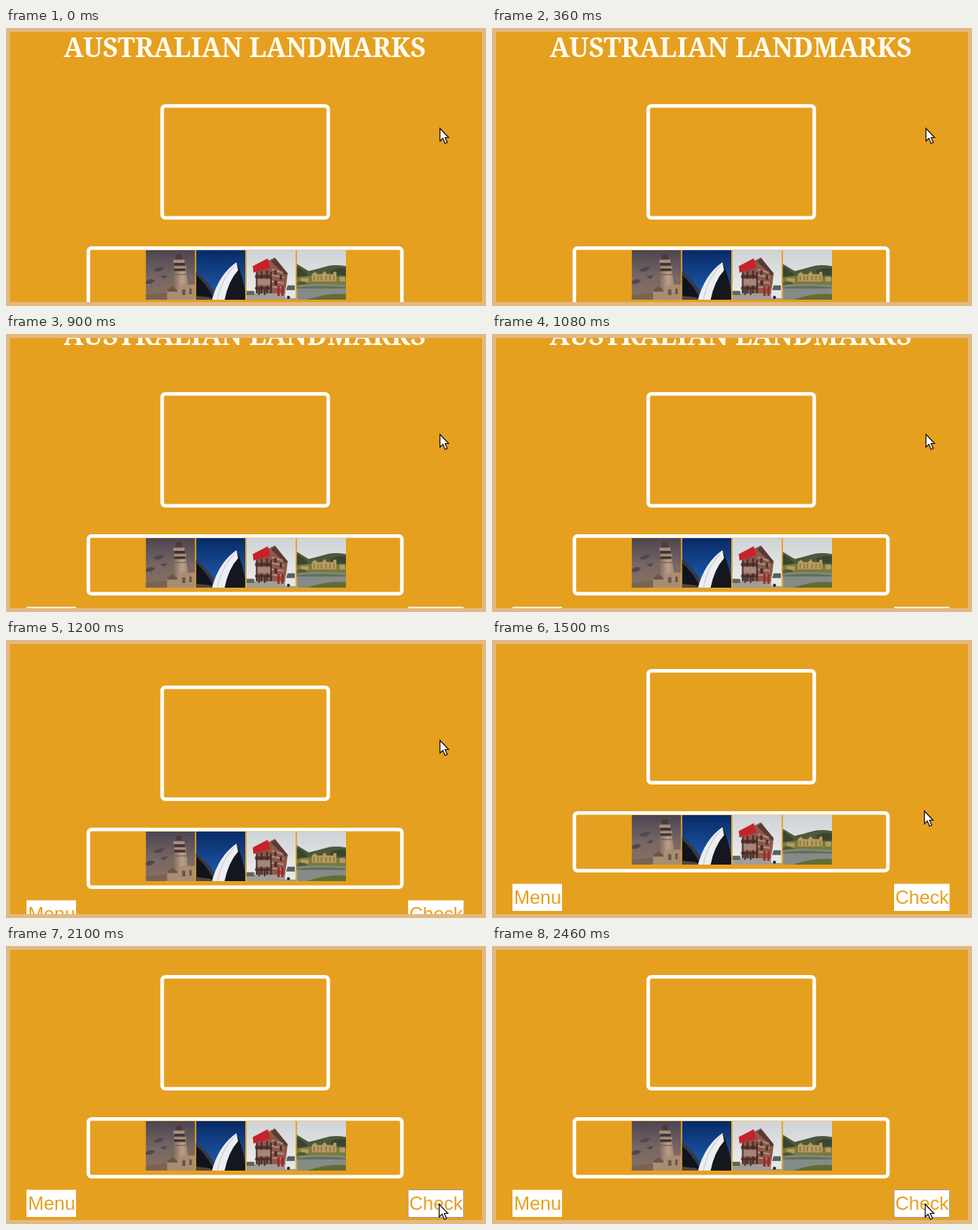
These frames come from a looping animation (610 by 354 pixels, 2.7 s). An HTML page:

```html
<!DOCTYPE html>
<html lang="en">
<head>
<meta charset="utf-8">
<title>Australian Landmarks</title>
<style>
  html, body { margin: 0; width: 100%; height: 100%; overflow: hidden; background: #e3b983; }
  #stage { display: block; width: 610px; height: 354px; }
  .heading { font: bold 33.6px "Noto Serif", serif; fill: #fffdf2; text-anchor: middle; }
  .button { font: 24px "Liberation Sans", Arial, sans-serif; fill: #e6a020; }
  .panel { fill: none; stroke: #fff; stroke-width: 4.5; }
  .page, .pointer, .pressed { animation: scroll 2.7s step-end infinite; }
  .pointer { animation-name: point; }
  .pressed { animation-name: press; }
  @keyframes scroll {
    0% { transform: translateY(0); }
    22.222% { transform: translateY(-11px); }
    33.333% { transform: translateY(-23px); }
    44.444% { transform: translateY(-39px); }
    55.555%, 100% { transform: translateY(-60px); }
  }
  @keyframes point {
    0% { transform: translate(551px, 127px); }
    55.555% { transform: translate(549px, 217px); }
    66.666%, 100% { transform: translate(550px, 328px); }
  }
  @keyframes press {
    0% { opacity: 0; }
    77.777%, 100% { opacity: 1; }
  }
</style>
</head>
<body>
<svg id="stage" viewBox="0 0 610 354">
  <defs>
    <clipPath id="view"><rect x="5" y="5" width="600" height="344"/></clipPath>
    <linearGradient id="dusk" x2="0" y2="1">
      <stop stop-color="#4c4550"/><stop offset=".55" stop-color="#776765"/><stop offset="1" stop-color="#8a7060"/>
    </linearGradient>
    <linearGradient id="blue" x2="0" y2="1">
      <stop stop-color="#082a66"/><stop offset="1" stop-color="#2161b4"/>
    </linearGradient>
    <linearGradient id="cloud" x2="0" y2="1">
      <stop stop-color="#cfd3d6"/><stop offset="1" stop-color="#f0f0ed"/>
    </linearGradient>
    <linearGradient id="tower">
      <stop stop-color="#6d5a4f"/><stop offset=".6" stop-color="#baa08a"/><stop offset="1" stop-color="#9a806d"/>
    </linearGradient>
  </defs>

  <rect width="610" height="354" fill="#e3b983"/>
  <g clip-path="url(#view)">
    <rect x="5" y="5" width="600" height="344" fill="#e6a020"/>
    <g class="page">
      <text class="heading" x="303.5" y="37">AUSTRALIAN LANDMARKS</text>
      <rect class="panel" x="198.5" y="99.2" width="211" height="142.6" rx="4"/>
      <rect class="panel" x="104.7" y="280.2" width="398.4" height="73.6" rx="4"/>

      <!-- lighthouse -->
      <svg x="177.5" y="283" width="62.5" height="63" viewBox="0 0 62 62" preserveAspectRatio="none">
        <rect width="62" height="62" fill="url(#dusk)"/>
        <path d="M9 25q6-5 15-4l-5 5q-6 2-10-1M0 39q6-5 12-1l-5 4H0M18 33l10-2-4 5z" fill="#51474c"/>
        <path d="M36 21H50L55 55H32z" fill="url(#tower)"/>
        <path d="M38 11V7q4-5 8 0v4z" fill="#4a3b38"/>
        <path d="M35 12H49V16H35zM36 20H51V23H36z" fill="#a98e7b"/>
        <path d="M36 16H49V19H36zM36 23H50V26H36z" fill="#3f3131"/>
        <path d="M36 30l15 0v1H36z" fill="#6c574c"/>
        <path d="M27 50l7-5 6 5 5-7H62V62H25z" fill="#a98d72"/>
        <path d="M27 50l7-5 6 5v2H27zM46 49h4v7h-4zM55 48h3v7h-3z" fill="#6b5549"/>
        <path d="M0 56L27 53V62H0z" fill="#796454"/>
      </svg>

      <!-- white sails -->
      <svg x="241.5" y="283" width="62.5" height="63" viewBox="0 0 62 62" preserveAspectRatio="none">
        <rect width="62" height="62" fill="url(#blue)"/>
        <path d="M0 27Q15 38 28 62H0z" fill="#10131c"/>
        <path d="M0 27Q14 36 25 55L22 59Q12 41 0 31z" fill="#343a45"/>
        <path d="M51 15Q29 30 20 62H40Q44 38 54 24z" fill="#eceef0"/>
        <path d="M51 15Q60 35 62 53V62H36Q41 38 53 25z" fill="#141720"/>
        <path d="M48 20Q32 36 27 62" fill="none" stroke="#c4cbd3"/>
        <path d="M0 57L18 59 21 62H0z" fill="#52463c"/>
      </svg>

      <!-- gabled pub -->
      <svg x="305.5" y="283" width="62.5" height="63" viewBox="0 0 62 62" preserveAspectRatio="none">
        <rect width="62" height="62" fill="url(#cloud)"/>
        <path d="M13 20L36 9 52 29 49 55H12z" fill="#8b5a4b"/>
        <path d="M31 14l5-4 16 19-2 3z" fill="#583a34"/>
        <path d="M11 31H30V35H11zM11 46H30V49H11z" fill="#54302a"/>
        <path d="M13 27v28M19 26v29M26 25v31M31 27v28" stroke="#432a27" stroke-width="2"/>
        <path d="M14 36H30V44H14z" fill="#a4877b"/>
        <path d="M8 20L27 10 30 22 9 28z" fill="#c7222c"/>
        <path d="M32 24l14 4M32 31l15 3M32 39l15 2M33 46l13 1" stroke="#b98b7a" stroke-width="2"/>
        <path d="M35 25h3v6h-3zM42 31h3v6h-3zM35 38h4v6h-4z" fill="#473331"/>
        <rect y="54" width="62" height="8" fill="#a19d96"/>
        <path d="M0 51h10v5H0z" fill="#606658"/>
        <path d="M39 45h3v12h-3zM44 45h3v12h-3z" fill="#a2282d"/>
        <path d="M51 42H62V60H49V50z" fill="#e4e7e5"/>
        <path d="M52 44H61V50H50z" fill="#526066"/>
        <circle cx="53" cy="59" r="2" fill="#292929"/>
        <path d="M15 48h2v8h-2zM22 47h2v9h-2z" fill="#3a3436"/>
      </svg>

      <!-- ruins by the water -->
      <svg x="369.5" y="283" width="62.5" height="63" viewBox="0 0 62 62" preserveAspectRatio="none">
        <rect width="62" height="62" fill="url(#cloud)"/>
        <path d="M0 17Q8 22 15 26 25 24 35 21 46 17 62 20V46H0z" fill="#4d583b"/>
        <path d="M0 20Q9 25 15 32L0 36zM43 25q9-4 19-2v8H43z" fill="#39452f"/>
        <path d="M0 34Q25 29 62 34V47H0z" fill="#777b3d"/>
        <path d="M19 30l4-3 3 3h6l3-4 3 4h8v-3h4v12H19zM5 35h10v5H5zM54 33h7v6h-7z" fill="#b89b60"/>
        <path d="M22 32v6M27 32v6M31 32v6M37 32v6M42 32v6M47 32v6" stroke="#715f40"/>
        <path d="M0 40Q9 37 14 42L0 45z" fill="#505d33"/>
        <path d="M0 44Q25 41 62 44V56Q42 54 16 62H0z" fill="#858b86"/>
        <path d="M0 46Q30 43 62 46V48H0z" fill="#636e5a"/>
        <path d="M13 62Q40 53 62 55V62z" fill="#626c35"/>
      </svg>

      <rect x="26" y="370.5" width="63" height="34.5" fill="#fff"/>
      <text class="button" x="28" y="396">Menu</text>
      <rect x="511" y="370.5" width="70.5" height="34.5" fill="#fff"/>
      <rect class="pressed" x="511" y="370.5" width="70.5" height="35" rx="2" fill="#fff" stroke="#a39a91"/>
      <text class="button" x="512.5" y="396">Check</text>
    </g>
    <path class="pointer" d="M.5 .8V17L4.2 13.5 7 20 9.8 18.8 7 12.5H11.5z" fill="#fff" stroke="#101010" stroke-width="1.2"/>
  </g>
</svg>
</body>
</html>
```
